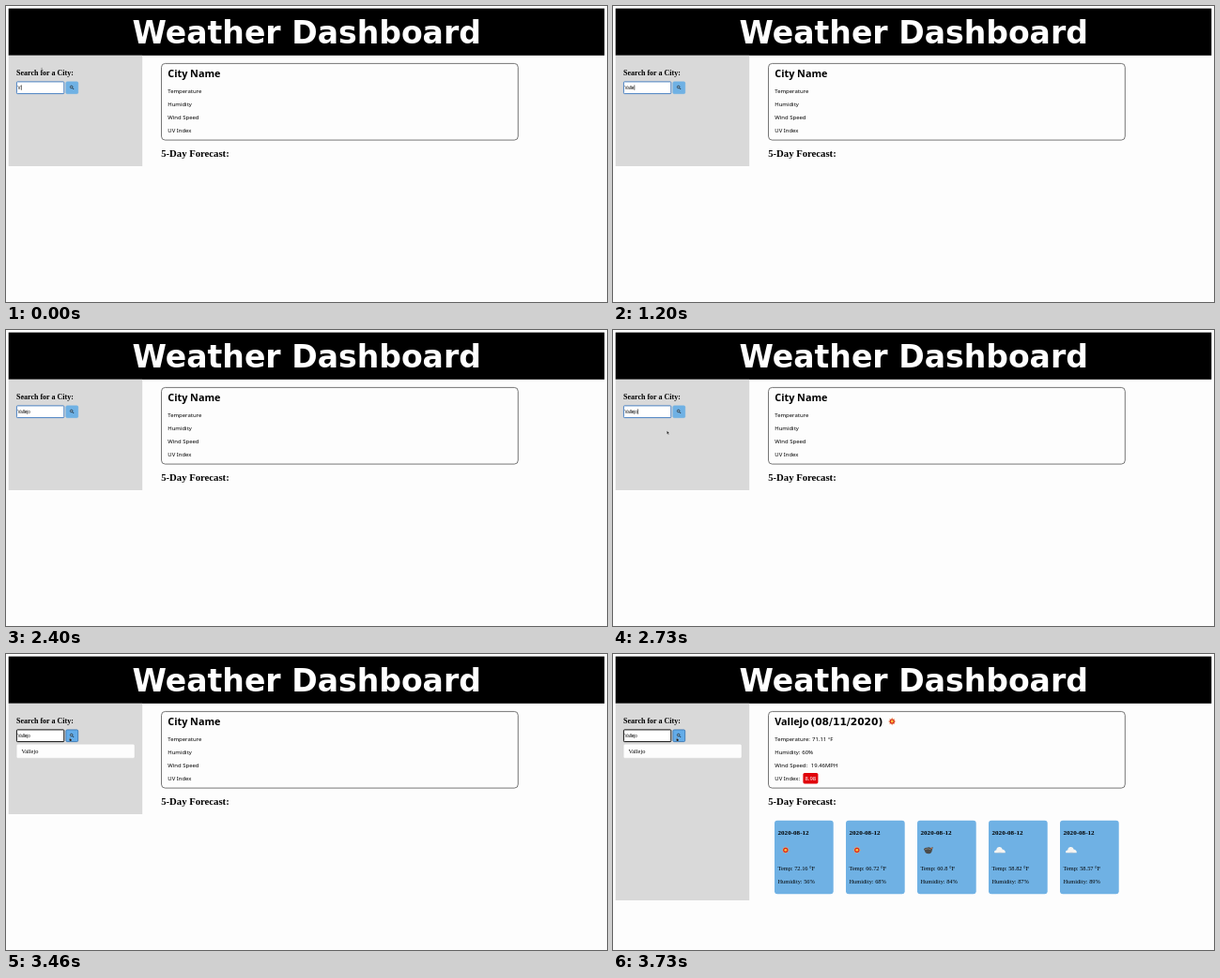
Write an HTML page that moves like this. It is 640x316 px and loops after 3800 ms.

```html
<!DOCTYPE html>
<html lang="en">
<head>
<meta charset="utf-8">
<title>Weather Dashboard</title>
<style>
  html, body { margin: 0; width: 100%; height: 100%; overflow: hidden; background: #fdfdfd; }
  svg { display: block; width: 100vw; height: 100vh; }
  text { white-space: pre; }
  .title { font: bold 33.1px "DejaVu Sans", sans-serif; fill: #fff; }
  .sans { font: 5.95px "Noto Sans", sans-serif; }
  .city { font: bold 10.8px "Noto Sans", sans-serif; }
  .date { font: bold 10.7px "DejaVu Sans", sans-serif; }
  .serif { font: 6.35px "Liberation Serif", serif; }
  .day { font: bold 7.1px "Liberation Serif", serif; }
  .search { font: bold 8px "Liberation Serif", serif; }
  .forecast { font: bold 10.7px "Liberation Serif", serif; }
  .typed { font: 4.5px "Liberation Sans", sans-serif; }
</style>
</head>
<body>
<svg viewBox="0 0 640 316" preserveAspectRatio="none">
  <defs>
    <g id="sun">
      <path d="M0-4.4L1-2.2 3.1-3.1 2.2-1 4.4 0 2.2 1 3.1 3.1 1 2.2 0 4.4-1 2.2-3.1 3.1-2.2 1-4.4 0-2.2-1-3.1-3.1-1-2.2Z" fill="#e9a06f"/>
      <circle r="2.6" fill="#d8261c"/>
      <circle r="1.4" fill="#ffc23d"/>
    </g>
    <g id="cloud">
      <path d="M-5.5 3Q-6.5.6-3.6 0Q-3-3.6.2-3.2Q2.4-2.8 2.8-.8Q6.2-.3 6 3Z" fill="#f4f4f2"/>
      <path d="M-5.5 3Q0 1.8 6 3Z" fill="#b9bcbd"/>
    </g>
    <g id="storm">
      <path d="M-4.8-.8Q-4.2-3-1.6-2.6Q.8-3.8 2.6-2L5-3.4 4 .2Q3.6 3.6.4 4Q-3.4 4-3.8 1Z" fill="#4b4b49"/>
      <path d="M-3.6-.6Q-.5-2.2 2.6-.6" fill="none" stroke="#8d8880" stroke-width=".8"/>
      <circle cx="3.4" cy="-2" r=".9" fill="#b86a42"/>
    </g>
  </defs>

  <rect width="640" height="316" fill="#fdfdfd"/>
  <rect x="2.7" y="2.6" width="634.6" height="50.2" fill="#000"/>
  <text class="title" x="134.5" y="40">Weather Dashboard</text>

  <rect id="panel" x="2.7" y="52.8" width="142.5" height="118.2" fill="#d9d9d9"/>
  <text class="search" x="11" y="73.5">Search for a City:</text>
  <rect id="field" x="11.4" y="80.9" width="50.4" height="12.7" rx=".8" fill="#fff" stroke-width="1"/>
  <text id="typed" class="typed" x="12.6" y="88.6"></text>
  <rect id="caret" y="84.4" width=".6" height="5.4" fill="#000"/>
  <rect id="button" x="63.9" y="80.9" width="12.8" height="12.7" rx="1.3" stroke-width=".8"/>
  <circle cx="69.7" cy="86.5" r="1.3" fill="#8fb9d6" stroke="#1b2a36" stroke-width=".8"/>
  <path d="M70.7 87.5L72.2 89" stroke="#1b2a36" stroke-width="1"/>
  <g id="recent">
    <rect x="11.2" y="96.2" width="125.8" height="15" rx="1.5" fill="#fdfdfd" stroke="#d0d0d0" stroke-width=".4"/>
    <text class="serif" x="16.4" y="105.7">Vallejo</text>
  </g>

  <rect x="165.5" y="61.4" width="379.8" height="81.7" rx="4" fill="none" stroke="#555" stroke-width=".8"/>
  <text id="city" class="city" x="172.3" y="75.6"></text>
  <g id="labels"></g>
  <g id="current">
    <text class="date" x="210.3" y="75.6">(08/11/2020)</text>
    <text class="sans" x="212" y="92.8">71.11 °F</text>
    <text class="sans" x="201.3" y="106.8">60%</text>
    <text class="sans" x="210.8" y="121">19.46MPH</text>
    <rect x="202.4" y="127" width="16" height="11.4" rx="1.6" fill="#e0040b"/>
    <text class="sans" x="204.4" y="135.1" fill="#fff">8.98</text>
  </g>
  <use id="nowIcon" href="#sun" x="297.2" y="72"/>
  <text class="forecast" x="165.2" y="161.3">5-Day Forecast:</text>
  <g id="cards"></g>

  <path id="beam" d="M37.2 66.4h1.8M38.1 66.4v5.2M37.2 71.6h1.8" fill="none" stroke="#777" stroke-width=".5"/>
  <path id="arrow" d="M0 0V3.9L.9 3.1 1.6 4.6 2.2 4.3 1.5 2.9H2.8Z" fill="#111" stroke="#fff" stroke-width=".3"/>
  <path id="hand" d="M.6 0V1.8L0 1.6 .8 3.6H2.5L2.8 1.7 1.3 1.3V0Z" fill="#111" stroke="#eee" stroke-width=".2"/>
</svg>
<script>
const LOOP = 3800;
const $ = id => document.getElementById(id);
const show = (id, on) => $(id).setAttribute("visibility", on ? "visible" : "hidden");
const set = (id, attrs) => { for (const k in attrs) $(id).setAttribute(k, attrs[k]); };
const between = (t, a, b) => t >= a && t < b;

const rows = [["Temperature", 92.8], ["Humidity", 106.8], ["Wind Speed", 121], ["UV Index", 135.1]];
const days = [["72.16", 56, "sun"], ["66.72", 68, "sun"], ["60.8", 84, "storm"], ["58.82", 87, "cloud"], ["58.57", 89, "cloud"]];
const keyTimes = [0, 260, 860, 1000, 1200, 1460, 1600];

// time, x, y of the pointer tip
const path = [
  [2400, 17, 69], [2460, 27, 79], [2530, 39, 92], [2600, 50, 104],
  [2660, 56, 108.5], [2730, 57.4, 107.4], [2800, 58.5, 106.5], [2860, 60, 105],
  [2930, 63, 100], [3000, 66, 94]
];

$("labels").innerHTML = rows.map(([name, y]) =>
  `<text class="sans" x="172.3" y="${y}">${name}</text>`).join("");

$("cards").innerHTML = days.map(([temp, hum, icon], i) => {
  const x = 172 + i * 76;
  return `<rect class="card" x="${x}" y="177.8" width="62.7" rx="3" fill="#6fb1e4"/>
    <text class="day" x="${x + 3.5}" y="193.2">2020-08-12</text>
    <use class="icon" href="#${icon}" x="${x + 11.8}" y="209.3"/>
    <g class="values">
      <text class="serif" x="${x + 3.5}" y="219">Temp: ${temp} °F</text>
      <text class="serif" x="${x + 3.5}" y="232.8">Humidity: ${hum}%</text>
    </g>`;
}).join("");

const each = (cls, fn) => document.querySelectorAll("." + cls).forEach(fn);

function render(t) {
  const typed = "Vallejo".slice(0, keyTimes.filter(k => t >= k).length);
  $("typed").textContent = typed;
  set("caret", { x: 12.9 + $("typed").getComputedTextLength() });
  show("caret", t < 800 || between(t, 860, 2060) || between(t, 2530, 3060));

  const clicked = t >= 3130, hover = t >= 3060;
  set("field", { stroke: clicked ? "#111" : "#4b82c3" });
  set("button", { fill: hover ? "#63ace9" : "#6fb1e4", stroke: hover ? "#2f6fae" : "#6fb1e4" });
  show("recent", t >= 3200);

  show("beam", t < 660);
  const p = path.filter(q => t >= q[0]).pop();
  show("arrow", p && !hover);
  if (p) set("arrow", { transform: `translate(${p[1]} ${p[2]})` });
  show("hand", hover);
  set("hand", { transform: `translate(67.1 ${t < 3460 ? 89 : 89.4})` });

  const loaded = t >= 3600, filled = t >= 3660, icons = t >= 3730;
  set("panel", { height: icons ? 210.2 : loaded ? 198.2 : 118.2 });
  show("cards", loaded);
  show("current", filled);
  show("nowIcon", icons);
  $("city").textContent = filled ? "Vallejo" : "City Name";
  [...$("labels").children].forEach((el, i) => el.textContent = rows[i][0] + (filled ? ":" : ""));
  each("card", el => el.setAttribute("height", icons ? 78.4 : 66.4));
  each("icon", el => el.setAttribute("visibility", icons ? "visible" : "hidden"));
  each("values", el => el.setAttribute("transform", `translate(0 ${icons ? 12 : 0})`));
}

const start = performance.now();
function tick() {
  render((performance.now() - start) % LOOP);
  requestAnimationFrame(tick);
}
tick();
</script>
</body>
</html>
```
